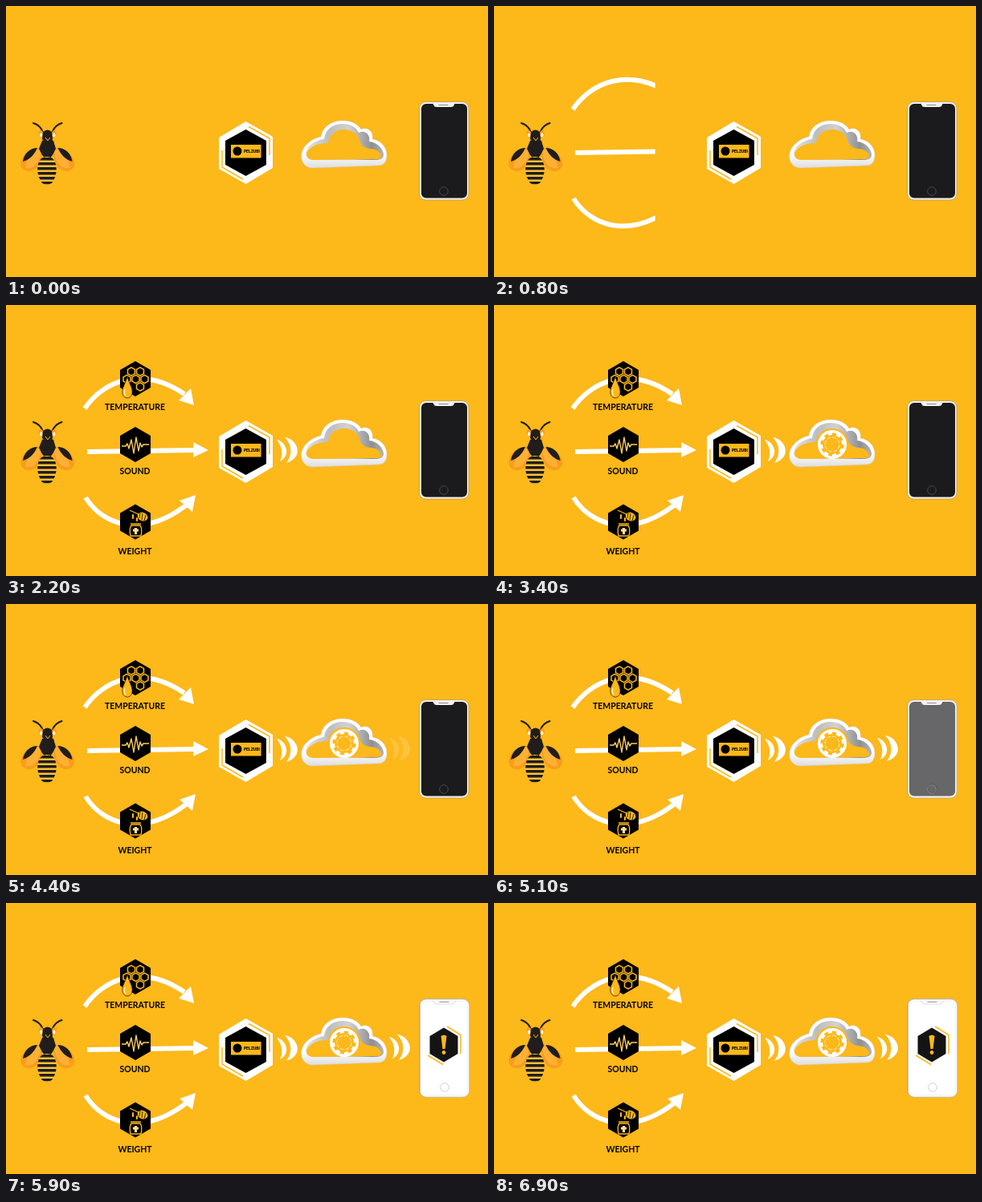
An HTML page that plays this animation: 600x338 px, repeating every 8 s.

```html
<!DOCTYPE html>
<html lang="en">
<head>
<meta charset="utf-8">
<title>Hive monitoring flow</title>
<style>
  html, body { margin: 0; width: 100%; height: 100%; overflow: hidden; background: #fdb81a; }
  svg { display: block; width: 100%; height: 100%; }
  text { font-family: Lato, sans-serif; font-weight: 700; font-size: 10.5px; text-anchor: middle; }
  .brand { font: 800 4.9px Inter, sans-serif; text-anchor: start; letter-spacing: -.1px; }

  .step { animation: 8s steps(6) infinite; }
  .wipe { animation-name: wipe; transform-origin: 94px 0; }
  .sensors { animation-name: sensors; }
  .upload { animation-name: upload; }
  .process { animation-name: process; }
  .download { animation-name: download; }
  .wake { animation-name: wake; }
  .alert { animation-name: alert; }
  .spin { animation: spin 8s steps(16) infinite; transform-origin: 421px 174px; }

  @keyframes wipe { 0%, 5% { transform: scaleX(0); } 12.5%, 100% { transform: scaleX(1); } }
  @keyframes sensors { 0%, 11.25% { opacity: 0; } 18.75%, 100% { opacity: 1; } }
  @keyframes upload { 0%, 20% { opacity: 0; } 27.5%, 100% { opacity: 1; } }
  @keyframes process { 0%, 30% { opacity: 0; } 37.5%, 100% { opacity: 1; } }
  @keyframes download { 0%, 53.75% { opacity: 0; } 61.25%, 100% { opacity: 1; } }
  @keyframes wake { 0%, 61.25% { opacity: 0; } 68.75%, 100% { opacity: 1; } }
  @keyframes alert { 0%, 66.25% { opacity: 0; } 73.75%, 100% { opacity: 1; } }
  @keyframes spin { 0%, 37.5% { transform: rotate(0); } 57.5%, 100% { transform: rotate(360deg); } }
</style>
</head>
<body>
<svg viewBox="0 0 600 338" preserveAspectRatio="none">
  <defs>
    <clipPath id="reveal"><rect class="step wipe" x="94" y="80" width="160" height="200"/></clipPath>
    <linearGradient id="wall">
      <stop offset="0" stop-color="#e4e4e4"/>
      <stop offset=".3" stop-color="#bdbdbf"/>
      <stop offset=".55" stop-color="#d2d2d2"/>
      <stop offset=".85" stop-color="#8f8f92"/>
      <stop offset="1" stop-color="#b5b5b5"/>
    </linearGradient>
    <linearGradient id="rim" x2="0" y2="1">
      <stop offset=".7" stop-color="#fff"/>
      <stop offset="1" stop-color="#dedede"/>
    </linearGradient>
    <path id="hex" d="M0-22L19-11V11L0 22L-19 11V-11Z"/>
    <path id="cell" d="M0-5.2L4.5-2.6V2.6L0 5.2L-4.5 2.6V-2.6Z"/>
    <g id="waves" fill="#fff">
      <path d="M337 168C348 170 356 187 341 195C345 186 344 177 337 168Z"/>
      <path d="M347 165C363 167 372 190 349 197C357 187 356 174 347 165Z"/>
    </g>
    <g id="wing">
      <path d="M45 177C35 176 23 182 19 192C16 202 23 207 31 206C40 204 45 193 45 177Z" fill="#f99d1c"/>
      <path d="M44 178C33 179 26 188 24 202C34 204 42 197 44 178Z" fill="#fdb034"/>
      <path d="M39 177C30 177 22 184 21 194C29 192 35 186 39 177Z" fill="#211d1c"/>
      <path d="M47 166C47 157 43 149 34 146" fill="none" stroke="#211d1c" stroke-width="2" stroke-linecap="round"/>
      <ellipse cx="44" cy="160" rx="3.2" ry="5" transform="rotate(-15 44 160)" fill="#f99d1c"/>
      <ellipse cx="43.7" cy="161" rx="1.8" ry="2.8" fill="#fff1cf"/>
    </g>
    <clipPath id="belly"><path d="M44 190Q51 186 58 190C65 197 64 212 57 221Q51 224 45 221C38 212 37 197 44 190Z"/></clipPath>
  </defs>

  <rect width="600" height="338" fill="#fdb81a"/>

  <g>
    <use href="#wing"/>
    <use href="#wing" transform="matrix(-1 0 0 1 103.5 0)"/>
    <path d="M45 168Q52 164 59 168L62 178Q59 185 55 190H48Q44 185 41 178Z" fill="#211d1c"/>
    <path d="M46 157Q52 152 57 157L58 166L52 173L45 166Z" fill="#211d1c"/>
    <path d="M49 164L52 168L55 164" fill="none" stroke="#fdb81a"/>
    <g clip-path="url(#belly)">
      <rect x="36" y="186" width="31" height="37" fill="#fdc23c"/>
      <path d="M51.5 189V223" stroke="#211d1c" stroke-width="32" stroke-dasharray="3.4 2.6"/>
    </g>
  </g>

  <g clip-path="url(#reveal)" fill="#fff">
    <g fill="none" stroke="#fff" stroke-width="6">
      <path d="M98 129C120 96 168 74 222 111"/>
      <path d="M101 183L236 181"/>
      <path d="M99 240C120 274 168 292 224 250"/>
    </g>
    <path d="M234 125L230 104L215 119Z"/>
    <path d="M252 181L233 171V190Z"/>
    <path d="M236 237L216 244L232 258Z"/>
  </g>

  <g class="step sensors">
    <use href="#hex" x="161" y="92"/>
    <use href="#hex" x="161" y="174"/>
    <use href="#hex" x="161" y="270.500"/>
    <g fill="none" stroke="#fdb81a" stroke-width="1.5">
      <use href="#cell" x="156" y="83"/><use href="#cell" x="167" y="83"/>
      <use href="#cell" x="150.500" y="92.500"/><use href="#cell" x="161.500" y="92.500"/><use href="#cell" x="172.500" y="92.500"/>
      <use href="#cell" x="167" y="102"/>
    </g>
    <path d="M151 89C153 98 158 103 157 110C156 118 146 118 145 110C144 103 149 98 151 89Z" fill="#fdb81a" stroke="#2b1c00" stroke-width=".7"/>
    <path d="M148 105Q146 110 149 113" fill="none" stroke="#fff0bd" stroke-width="1.4"/>
    <path d="M144 176H149L151 173L153 179L156 168L159 185L162 165L165 182L167 172L169 177L171 174H178" fill="none" stroke="#ffcf5e" stroke-width="1.4" stroke-linejoin="round"/>
    <g fill="none" stroke="#fdb81a" stroke-width="1.3">
      <path d="M154 256L165 261"/>
      <ellipse cx="170" cy="264" rx="6" ry="4.500" transform="rotate(25 170 264)" fill="#fdb81a"/>
      <path d="M167 259L166 266M170 260L169 268M174 262L172 269" stroke="#000" stroke-width=".8"/>
      <path d="M158 262V266M163 266V269" stroke-width="2" stroke-linecap="round"/>
      <path d="M155 273H168M156 275Q153 279 155 288H168Q170 279 167 275Z"/>
      <path d="M158 281H165M161.500 278V286" stroke="#ffe3a0" stroke-width="3"/>
    </g>
    <text x="160.500" y="131">TEMPERATURE</text>
    <text x="160.500" y="211">SOUND</text>
    <text x="160.500" y="311">WEIGHT</text>
  </g>

  <g>
    <path d="M298.500 144L332 163V202L298.500 222L265 203V164Z" fill="#fff"/>
    <path d="M298.500 154L324 168V198L298.500 212L273 198V168Z"/>
    <path d="M302 150.500L328 165V186M269 180V201L295 216" fill="none" stroke="#fdb81a" stroke-width="1.5"/>
    <rect x="280" y="173" width="37.500" height="16.500" fill="#fdb81a"/>
    <circle cx="288" cy="181" r="5.500"/>
    <text class="brand" x="296" y="183">PELZUBI</text>
  </g>

  <use class="step upload" href="#waves"/>

  <g>
    <path d="M380 202C371 201 366 192 368 184C370 173 382 165 392 163C394 150 406 143 419 143C430 143 438 147 442 154C450 150 458 157 456 166C467 168 474 176 474 186C474 195 470 199 463 199Z" fill="url(#rim)" stroke="#cfcfcf" stroke-width=".5"/>
    <path d="M381 192C373 191 371 183 375 178C378 172 388 167 396 166C397 154 407 147 419 147C429 147 436 151 439 158C447 154 454 161 452 169C461 170 468 176 470 184C471 190 466 192 460 192Z" fill="url(#wall)"/>
    <path d="M382 192C373 191 372 184 377 179C382 173 392 171 401 171C402 160 411 153 423 154C431 155 438 160 440 167C441 173 446 177 453 178C461 178 466 182 467 187C467 190 464 191 460 191Z" fill="#fdb81a"/>
  </g>

  <g class="step process">
    <circle cx="421" cy="174" r="18" fill="#fff"/>
    <g class="spin" fill="none" stroke="#fdb81a">
      <circle cx="421" cy="174" r="11.500" fill="#fdb81a"/>
      <circle cx="421" cy="174" r="13" stroke-width="3.200" pathLength="16" stroke-dasharray="1"/>
      <circle cx="421" cy="174" r="9" stroke="#fff0c8" stroke-width="1" pathLength="16" stroke-dasharray="1.500 .5"/>
    </g>
  </g>

  <use class="step download" href="#waves" transform="translate(140 -1)"/>

  <g>
    <rect x="514.500" y="119.500" width="61.500" height="122.500" rx="8" fill="#f3f1ec" stroke="#b99a55" stroke-width=".8"/>
    <rect x="517" y="122" width="57" height="117.500" rx="6" fill="#1b1a1c"/>
    <path d="M530 121H560Q558 122 557.500 124Q557 126 554 126H536Q533 126 532.500 124Q532 122 530 121Z" fill="#f3f1ec"/>
    <path d="M539 123.500H550" stroke="#8b8b8b" stroke-width="1.200" stroke-linecap="round"/>
    <circle cx="545" cy="231" r="5.300" fill="none" stroke="#48464a"/>
  </g>
  <g class="step wake" fill="none" stroke="#d2d2d2">
    <rect x="515.500" y="120" width="61" height="122" rx="8" fill="#fff" stroke="#cdc8bb"/>
    <rect x="517.500" y="122.500" width="57" height="117" rx="6" stroke="#e8e8e8" stroke-width=".7"/>
    <path d="M531 122Q533 126 536 126H555Q558 126 560 122" stroke-width=".8"/>
    <path d="M540 123.500H551" stroke="#999" stroke-width="1.200" stroke-linecap="round"/>
    <circle cx="546" cy="230" r="5.300"/>
  </g>
  <g class="step alert">
    <path d="M545 155.500L562.500 166V188L545 198.500L527.500 188V166Z" fill="#141414"/>
    <path d="M549 154L566 164.500V188M525 190L544 201.500" fill="none" stroke="#fdb81a" stroke-width="1.500"/>
    <path d="M541.500 166Q545 163.500 548.500 166L546.500 182H543.500Z" fill="#fdb81a"/>
    <circle cx="545" cy="186.500" r="2.400" fill="#fdb81a"/>
  </g>
</svg>
</body>
</html>
```
